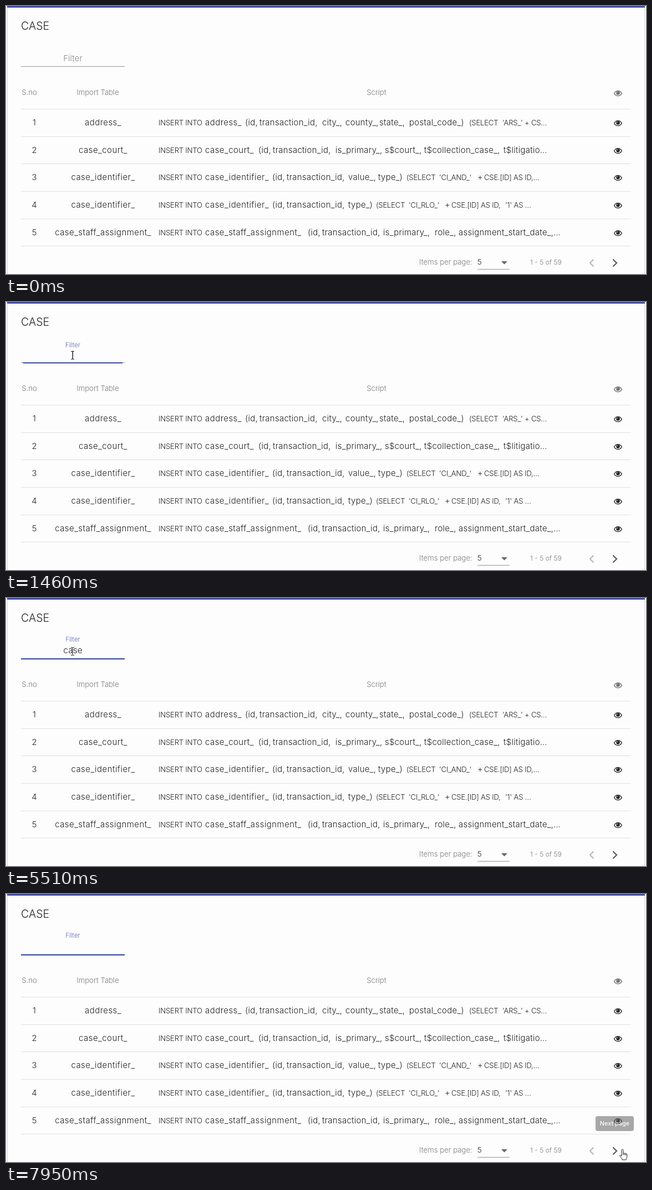
Write an HTML page that moves like this. It is 1154 px wide and 485 px high and loops after 8000 ms.

```html
<!DOCTYPE html>
<html lang="en">
<head>
<meta charset="utf-8">
<title>Import scripts table</title>
<style>
  html, body { margin: 0; width: 100%; height: 100%; overflow: hidden; background: #fdfdfd; }
  svg { display: block; width: 1154px; height: 485px; font: 350 15px Inter, "Open Sans", sans-serif; fill: #222; }
  .mid { text-anchor: middle; }
  .cell { letter-spacing: .25px; }
  .name { letter-spacing: .45px; }
  .caps { font-size: 13.2px; letter-spacing: -.25px; }
  .head, .pager { font-size: 13.2px; fill: #7b7b7b; }
  .typed { font-size: 15.5px; }
  .stroke { fill: none; stroke: currentColor; }

  /* one loop is 8 s, so 1% is 80 ms */
  .move { animation: 8s linear infinite; }
  .cut { animation: 8s step-end infinite; opacity: 0; }

  #label { animation-name: float; }
  @keyframes float {
    0%, 16.5% { transform: translate(120.5px, 100px); fill: #8a8a8a; animation-timing-function: cubic-bezier(.25, .8, .25, 1); }
    21.5%, 100% { transform: translate(120.5px, 79px) scale(.75); fill: #5563bd; }
  }
  #ripple { animation-name: ripple; transform-origin: 120.5px 110px; }
  @keyframes ripple {
    0%, 16.5% { transform: scaleX(.5); opacity: 0; animation-timing-function: cubic-bezier(.25, .8, .25, 1); }
    20.25%, 100% { transform: none; opacity: 1; }
  }

  #c1 { animation-name: c1; }
  #c2 { animation-name: c2; }
  #c3 { animation-name: c3; }
  #c4 { animation-name: c4; }
  #selected { animation-name: selected; }
  @keyframes c1 { 0% { opacity: 0 } 30.375% { opacity: 1 } 31.375%, 100% { opacity: 0 } }
  @keyframes c2 { 0% { opacity: 0 } 31.375% { opacity: 1 } 34.375%, 100% { opacity: 0 } }
  @keyframes c3 { 0% { opacity: 0 } 34.375% { opacity: 1 } 36.25%, 100% { opacity: 0 } }
  @keyframes c4 { 0% { opacity: 0 } 36.25% { opacity: 1 } 71.875%, 100% { opacity: 0 } }
  @keyframes selected { 0% { opacity: 0 } 71.875% { opacity: 1 } 74.5%, 100% { opacity: 0 } }

  #caret { animation-name: caret; }
  @keyframes caret {
    0% { opacity: 0; transform: none; }
    16.5%, 28.625% { opacity: 1; transform: none; }
    22.875% { opacity: 0; transform: none; }
    30.375% { opacity: 1; transform: translateX(5px); }
    31.375% { opacity: 1; transform: translateX(9px); }
    34.375% { opacity: 1; transform: translateX(13px); }
    36.25%, 49.625%, 63.375% { opacity: 1; transform: translateX(17px); }
    42.75%, 56.5%, 68.875% { opacity: 0; transform: translateX(17px); }
    74.5%, 88% { opacity: 1; transform: none; }
    81.25%, 94.875%, 100% { opacity: 0; transform: none; }
  }

  #arrow { animation-name: arrowOn; }
  #arrow .move { animation-name: arrowPath; }
  @keyframes arrowOn { 0% { opacity: 0 } 2.625% { opacity: 1 } 11.875% { opacity: 0 } 82.5% { opacity: 1 } 92%, 100% { opacity: 0 } }
  @keyframes arrowPath {
    0%, 2.625% { transform: translate(260px, 40px); }
    6% { transform: translate(185px, 54px); }
    10.625%, 12% { transform: translate(136.5px, 73.5px); }
    82.4% { transform: translate(300px, 170px); }
    83.25% { transform: translate(560px, 285px); }
    83.875%, 84.5% { transform: translate(777.5px, 374.5px); }
    85.25%, 88% { transform: translate(940px, 430px); }
    92%, 100% { transform: translate(1080px, 454px); }
  }

  #beam { animation-name: beam; }
  @keyframes beam {
    0% { opacity: 0; transform: none; }
    11.875% { opacity: 1; transform: translate(3px, -1px); }
    13.625% { opacity: 1; transform: none; }
    82.5%, 100% { opacity: 0; transform: none; }
  }

  #hand { animation-name: handOn; }
  #hand .move { animation-name: handPath; }
  @keyframes handOn { 0% { opacity: 0 } 92%, 100% { opacity: 1 } }
  @keyframes handPath {
    0%, 92% { transform: translate(1080px, 455px); }
    93%, 94.875% { transform: translate(1098px, 458px); }
    97.5%, 100% { transform: translate(1111.5px, 462.5px); }
  }

  #tip { animation-name: tip; }
  @keyframes tip { 0% { opacity: 0 } 97.5% { opacity: .25 } 99.375%, 100% { opacity: .55 } }
</style>
</head>
<body>
<svg viewBox="0 0 1154 485">
  <defs>
    <g id="eye">
      <path class="stroke" stroke-width="1.4" d="M-6.8 .3C-4-6 4-6 6.8 .3C4 6-4 6-6.8 .3Z"/>
      <circle cy="-.6" r="3.3" fill="currentColor"/>
      <path d="M-1.8-.8A1.9 1.9 0 0 1 0-2.5" fill="none" stroke="#fff" stroke-width=".8"/>
    </g>
  </defs>

  <path d="M2.5 3V485M1151.5 3V485" stroke="#d4d4d6"/>
  <rect x="2" width="1150" height="3" fill="#444db1"/>
  <text x="27" y="43" font-size="19.6">CASE</text>

  <rect x="27" y="109" width="187" height="1" fill="#949494"/>
  <rect id="ripple" class="move" x="27" y="109" width="187" height="2.3" fill="#3f51b5"/>
  <text id="label" class="mid move" font-size="15">Filter</text>

  <g class="mid typed">
    <text id="c1" class="cut" x="120.5" y="100">c</text>
    <text id="c2" class="cut" x="120.5" y="100">ca</text>
    <text id="c3" class="cut" x="120.5" y="100">cas</text>
    <text id="c4" class="cut" x="120.5" y="100">case</text>
    <g id="selected" class="cut">
      <rect x="103" y="88" width="35" height="16" fill="#3297fd"/>
      <text x="120.5" y="100" fill="#fff">case</text>
    </g>
  </g>
  <rect id="caret" class="cut" x="120" y="88" width="1" height="16"/>

  <g class="head mid">
    <text x="42" y="161">S.no</text>
    <text x="165.5" y="161">Import Table</text>
    <text x="668" y="161">Script</text>
  </g>
  <use href="#eye" x="1103.5" y="158" color="#6c6c6c"/>
  <g id="rows"></g>

  <g class="pager">
    <text x="745" y="468">Items per page:</text>
    <text x="850" y="468" fill="#222">5</text>
    <rect x="850" y="476" width="58" height="1" fill="#949494"/>
    <path d="M893 462h11l-5.5 5.5Z" fill="#666"/>
    <text x="945" y="468" font-size="12.2">1 - 5 of 59</text>
    <g class="stroke" stroke-width="2">
      <path d="M1059.5 458.5L1053 465L1059.5 471.5" stroke="#b5b5b5"/>
      <path d="M1094.5 458.5L1101 465L1094.5 471.5" stroke="#5c5c5c" stroke-width="2.3"/>
    </g>
  </g>

  <g id="tip" class="cut">
    <rect x="1063" y="402" width="69" height="27" rx="4" fill="#616161"/>
    <text class="mid" x="1097.5" y="419" font-size="10.9" font-weight="500" fill="#fff">Next page</text>
  </g>

  <path id="beam" class="cut stroke" color="#222" d="M117 89.5h2.3l.7 .6 .7-.6h2.3M120 90v13M117 103.5h2.3l.7-.6 .7 .6h2.3"/>
  <g id="arrow" class="cut">
    <path class="move" fill="#fff" stroke="#222" d="M0 0V14L3.2 11 5.4 16.4 7.6 15.5 5.4 10.3H9.8Z"/>
  </g>
  <g id="hand" class="cut">
    <g class="move" fill="#fff" stroke="#222" stroke-linejoin="round">
      <path d="M-1.5 12V1.2a1.5 1.5 0 0 1 3 0V7q1-1.2 2.4 .2 1-.9 2.3 .3 2-.4 2 1.5V13q0 2.5-1.5 4V18.5H-.5V17L-4.6 11.8q-.8-1.6 .8-1.8 1.2 0 2.3 2Z"/>
      <path d="M1.5 7v3M3.9 7.2v3M6.2 7.5v3" fill="none"/>
    </g>
  </g>
</svg>
<script>
  // Each row: table name, x of the column list, then x / phrase pairs.
  const rows = [
    ["address_", 431, 570, "city_,", 612, "county_,", 673, "state_,",
      727, "postal_code_)", 835, "(SELECT", 895, "'ARS_' + CS…"],
    ["case_court_", 455, 594, "is_primary_,", 683, "s$court_,",
      754, "t$collection_case_,", 897, "t$litigatio…"],
    ["case_identifier_", 480, 617, "value_,", 671, "type_)",
      722, "(SELECT", 781, "'CI_AND_'", 850, "+", 862, "CSE.[ID] AS ID,…"],
    ["case_identifier_", 480, 617, "type_)",
      667, "(SELECT", 726, "'CI_RLO_'", 791, "+", 803, "CSE.[ID] AS ID,", 900, "'1' AS …"],
    ["case_staff_assignment_", 544, 680, "is_primary_,",
      773, "role_,", 816, "assignment_start_date_,…"],
  ];
  const text = (x, y, s, cls = "") => `<text x="${x}" y="${y}" class="${cls}">${s}</text>`;
  const phrase = (x, y, s) => text(x, y, s, /[A-Z]/.test(s) ? "caps" : "cell");
  const line = i => `<rect x="27" y="${Math.round(186 + i * 49.65)}" width="1100" height="1" fill="#e0e0e0"/>`;

  let markup = line(0);
  rows.forEach(([name, columns, ...parts], i) => {
    const y = Math.round(216 + i * 49.65);
    markup += line(i + 1) + text(51, y, i + 1, "mid") + text(175, y, name, "mid name")
      + phrase(275, y, "INSERT INTO") + text(359, y, name, "name")
      + phrase(columns, y, "(id,") + phrase(columns + 26, y, "transaction_id,");
    for (let k = 0; k < parts.length; k += 2) markup += phrase(parts[k], y, parts[k + 1]);
    markup += `<use href="#eye" x="1103.5" y="${y - 4}" color="#222"/>`;
  });
  document.getElementById("rows").innerHTML = markup;
</script>
</body>
</html>
```
